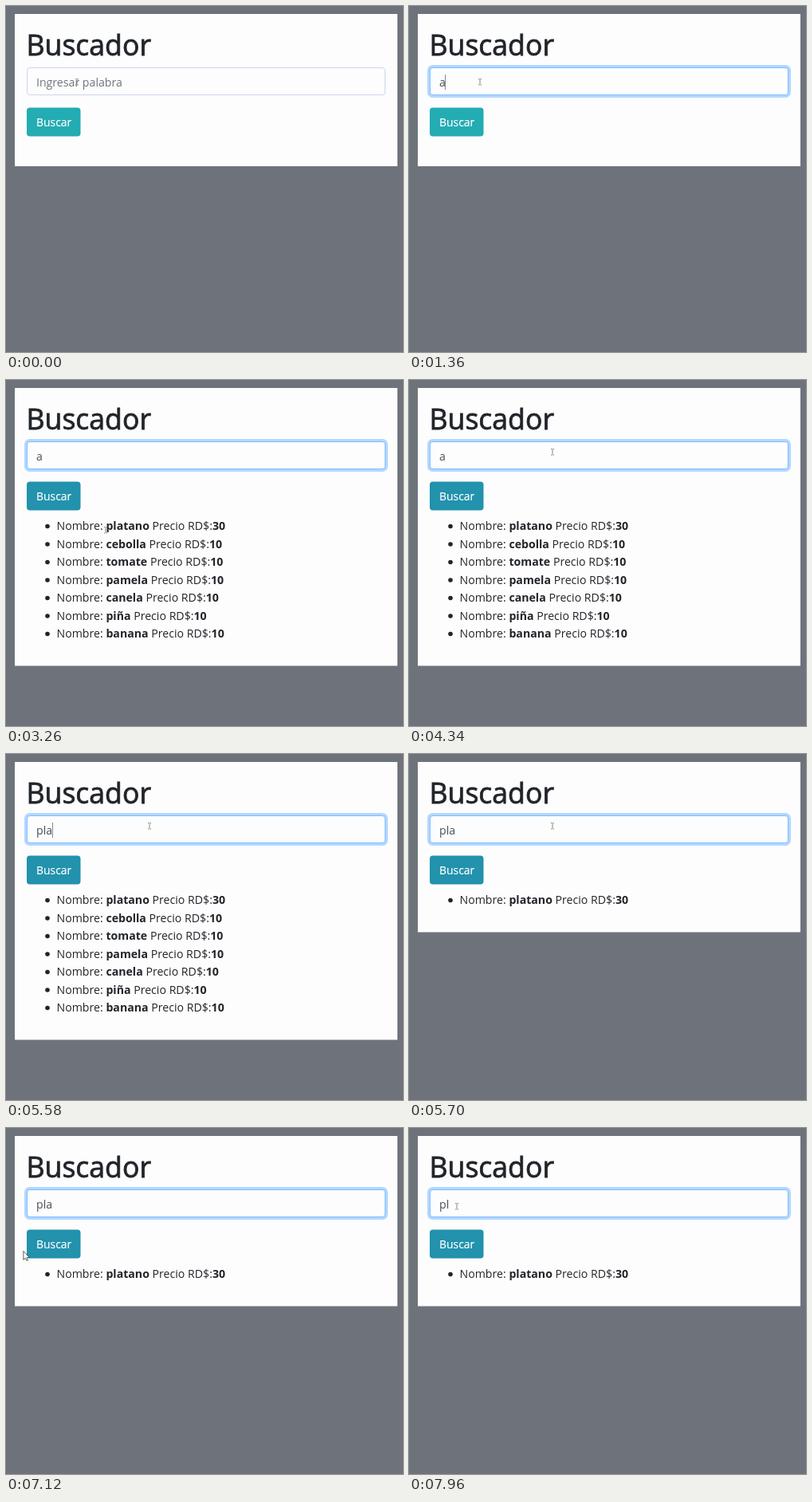
Recreate the animation shown at these times as an HTML page. Size 498 by 434 pixels, loop 8 s.

```html
<!DOCTYPE html>
<html lang="es">
<head>
<meta charset="utf-8">
<title>Buscador</title>
<style>
  html, body { margin: 0; width: 100%; height: 100%; overflow: hidden; background: #6e737b; }
  svg { display: block; width: 498px; height: 434px; font: 14.15px "Open Sans", "Noto Sans", sans-serif; }
  #title { font-size: 35.6px; fill: #212529; stroke: #212529; stroke-width: .8px; }
  #list { fill: #212529; }
  #list tspan { font-weight: 700; }
</style>
</head>
<body>
<svg viewBox="0 0 498 434">
  <rect id="card" x="11" y="10" width="480" fill="#fdfdfe"/>
  <text id="title" x="25.5" y="62">Buscador</text>
  <rect id="glow" x="23" y="74" width="456" height="41" rx="6.5" fill="#b3d7ff"/>
  <rect id="field" x="26.5" y="77.5" width="449" height="34" rx="3.5" fill="#fdfdfe"/>
  <text id="hint" x="38" y="101" fill="#6c757d">Ingresar palabra</text>
  <text id="typed" x="38" y="101" fill="#495057"></text>
  <rect id="caret" y="86" width="1" height="19" fill="#808890"/>
  <rect id="button" x="26" y="127.5" width="67.5" height="36" rx="4"/>
  <text x="38" y="151" font-size="13.9" fill="#fff" stroke="#fff" stroke-width=".2">Buscar</text>
  <g id="list"></g>
  <path id="beam" d="M-2-3.5h1.5M.5-3.5H2M0-3V3.5M-2 4h1.5M.5 4H2" fill="none" stroke="#777" stroke-width=".9"/>
  <path id="hand" d="M-1.5-5.5q1-1 2 0V-1.5L4-.5Q5 0 4.5 2.5L3.5 5.5H-1.5L-4.5 1.5Q-4 .2-2.8 1L-1.5 2Z"
        fill="#fff" stroke="#333" stroke-width=".8"/>
  <path id="arrow" d="M-3-6V5L-.5 2.8 1 6 2.7 5.2 1.2 2.2H4.5Z" fill="#fff" stroke="#333" stroke-width=".8"/>
</svg>
<script>
const LOOP = 8000, BLINK = 530;
const $ = id => document.getElementById(id);
const set = (id, attrs) => { for (const k in attrs) $(id).setAttribute(k, attrs[k]); };
const show = (id, on) => set(id, { visibility: on ? 'visible' : 'hidden' });
const clamp = v => Math.max(0, Math.min(1, v));
const ease = v => v * v * (3 - 2 * v);
const mix = (a, b, k) => `rgb(${a.map((v, i) => Math.round(v + (b[i] - v) * k))})`;

const products = [['platano', 30], ['cebolla', 10], ['tomate', 10], ['pamela', 10],
                  ['canela', 10], ['piña', 10], ['banana', 10]];
$('list').innerHTML = products.map(([name, price], i) => {
  const y = 188 + i * 22.5;
  return `<g><circle cx="52" cy="${y - 4.5}" r="2.8"/><text x="63.5" y="${y}">Nombre: ` +
    `<tspan>${name}</tspan> Precio RD$:<tspan>${price}</tspan></text></g>`;
}).join('');
const rows = [...$('list').children];

// [time, value] steps; the latest one reached holds
const typing = [[0, ''], [1360, 'a'], [4560, ''], [4760, 'p'], [4960, 'pl'], [5160, 'pla'], [7700, 'pl']];
const results = [[0, 0, 201], [1720, 7, 358.5], [5660, 1, 223.5]];
const caretStarts = [[380], [1360], [4560], [4760], [4960], [5160]];
const latest = (steps, t) => steps.filter(s => s[0] <= t).pop();

// pointer stops: time, x, y
const path = [[0, 89, 95], [1740, 89, 95], [2200, 58, 149], [2480, 58, 149], [2840, 112, 196],
  [3100, 125, 188], [3340, 125, 188], [3900, 180, 90], [5760, 180, 90], [6300, 41, 157],
  [6760, 41, 157], [7060, 22, 162], [7300, 40, 152], [7560, 65, 136], [7860, 60, 98], [LOOP, 60, 98]];

function pointerAt(t) {
  const i = path.findIndex(p => p[0] > t), a = path[i - 1], b = path[i];
  const k = ease((t - a[0]) / (b[0] - a[0]));
  return [a[1] + (b[1] - a[1]) * k, a[2] + (b[2] - a[2]) * k];
}

function draw(t) {
  const focus = ease(clamp((t - 380) / 90));
  set('glow', { opacity: focus });
  set('field', { stroke: mix([206, 212, 238], [128, 189, 255], focus) });

  const text = latest(typing, t)[1];
  $('typed').textContent = text;
  show('hint', !text && t < 1360);
  const since = latest(caretStarts, t);
  show('caret', since && t < 7700 && Math.floor((t - since[0]) / BLINK) % 2 === 0);
  set('caret', { x: Math.floor(38 + (text ? $('typed').getComputedTextLength() : 0)) });

  const [, count, bottom] = latest(results, t);
  set('card', { height: bottom - 10 });
  rows.forEach((row, i) => row.setAttribute('visibility', i < count ? 'visible' : 'hidden'));
  set('button', { fill: mix([36, 172, 179], [34, 146, 173], clamp((t - 2050) / 150)) });

  const [x, y] = pointerAt(t);
  const inside = (l, top, r, b) => x >= l && x <= r && y >= top && y <= b;
  const onButton = inside(26, 127, 94, 163);
  const onText = inside(26, 77, 476, 112) || (count && inside(62, 173, 277, 200));
  show('hand', onButton);
  show('beam', !onButton && onText);
  show('arrow', !onButton && !onText);
  for (const id of ['hand', 'beam', 'arrow']) set(id, { transform: `translate(${x} ${y})` });
}

const start = performance.now();
function tick() {
  draw((performance.now() - start) % LOOP);
  requestAnimationFrame(tick);
}
tick();
</script>
</body>
</html>
```
